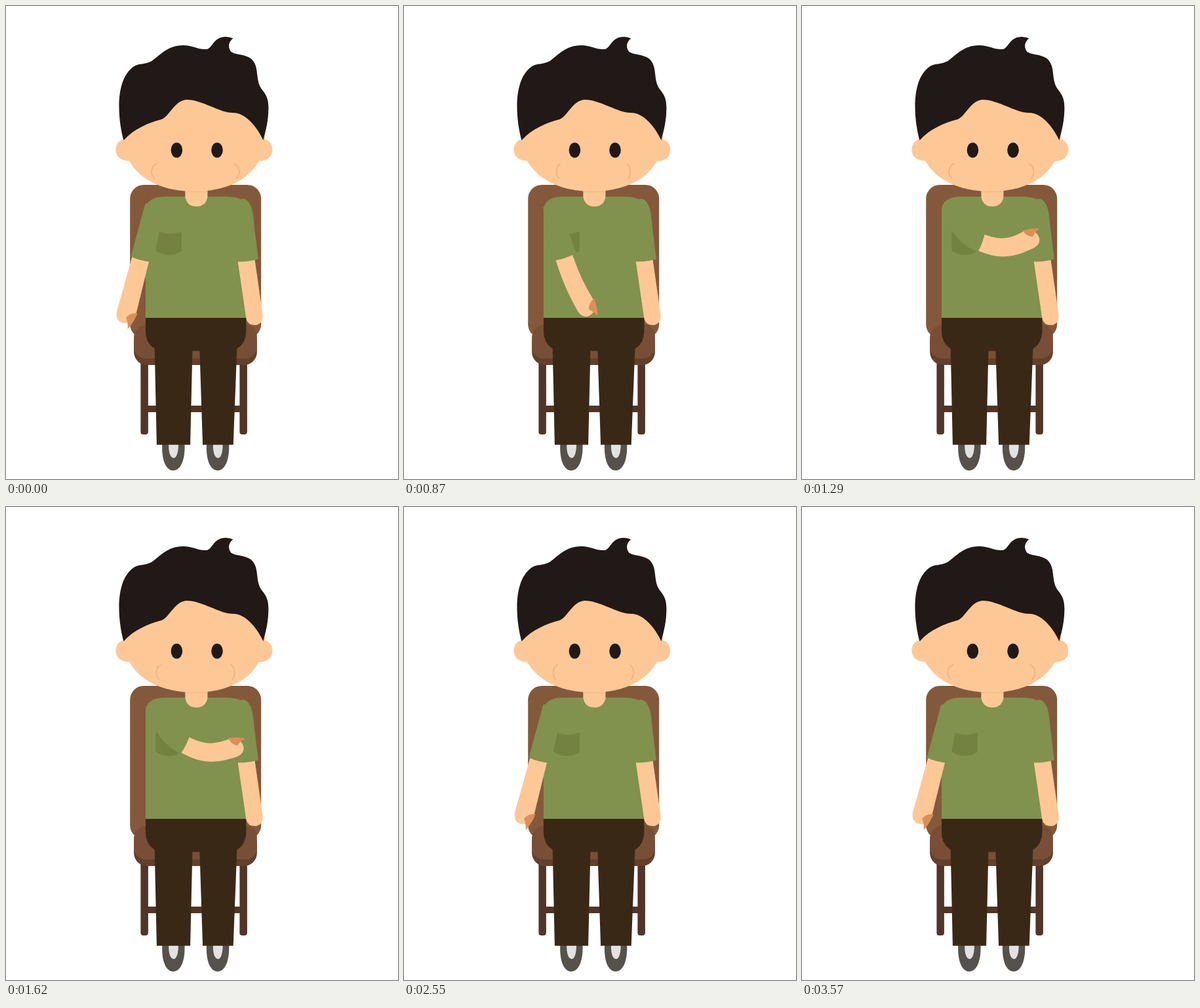
An HTML page that plays this animation: 598 by 722 pixels, repeating every 3600 ms.

```html
<!DOCTYPE html>
<html lang="en">
<head>
<meta charset="utf-8">
<title>Seated man</title>
<style>
  html, body { margin: 0; width: 100%; height: 100%; overflow: hidden; background: #fff; }
  svg { display: block; width: 100%; height: 100%; }
  .skin { fill: #fec896; }
  .shirt { fill: #80924e; }
  .pants { fill: #3a2816; }
  .frame { fill: #513527; }
  .cheek { fill: none; stroke: #efb582; stroke-width: 2; stroke-linecap: round; }
</style>
</head>
<body>
<svg viewBox="0 0 598 722">
  <g transform="translate(0.4 0)">
    <!-- chair -->
    <g class="frame">
      <rect x="205" y="530" width="11.500" height="124" rx="4"/>
      <rect x="356" y="530" width="11.500" height="124" rx="4"/>
      <rect x="212" y="610" width="150" height="10"/>
    </g>
    <rect fill="#84593b" x="188.800" y="273" width="200" height="234" rx="21"/>
    <path fill="#62402b" d="M194.700 510H382.500V528A20 20 0 0 1 362.500 548H214.700A20 20 0 0 1 194.700 528Z"/>
    <path fill="#784f36" d="M213 486H366Q382.500 488 382.500 504V520A18 18 0 0 1 364.500 538H212.700A18 18 0 0 1 194.700 520V504Q197 489 213 486Z"/>

    <!-- shoes and trousers -->
    <g id="shoe">
      <path fill="#56524b" d="M238 667H272C273.500 692 266 709 255 709C243 709 236.500 692 238 667Z"/>
      <path fill="#e3e2e0" d="M248 667H262.500C263 680 260 690 255.500 690C250 690 247 680 248 667Z"/>
    </g>
    <use href="#shoe" x="67.700"/>
    <path class="pants" d="M212.500 475H366V497Q365 516 352 523L346.300 669.800H299.700L295 526.500H284L280.700 669.800H229.500L226.300 523Q213 515 212.500 497Z"/>

    <!-- torso -->
    <path class="shirt" d="M212.500 476V312Q213 291 243 291H335Q350 291 357 295L366 310V476Z"/>
    <path class="skin" d="M353 388L379 386L391 470Q393 483 382 487Q368 488 366 477Z"/>
    <path class="shirt" d="M350 300L357 295Q369 291 375 311Q377 320 378 334L384.500 386.500Q368 391 352 390L340 340Z"/>
    <path fill="#738241" d="M228 342Q248 352 267.500 344V374Q250 386 228 374Z"/>
    <path class="skin" d="M273 275H307V292Q304 306 290 306Q276 306 273 292Z"/>
    <path stroke="#f0b988" stroke-width="1.500" d="M273 283.500H307"/>

    <!-- head -->
    <g class="skin">
      <path d="M189 204C176 200 167 209 167 219C167 231 176 237 191 236.500Z"/>
      <path d="M384 204C397 200 406 209 406 219C406 231 397 238 382 236.500Z"/>
      <path d="M178 200L240 120H340L395 200C393 254 348 283 287 283S180 254 178 200Z"/>
    </g>
    <path fill="#211917" d="M179 205C170 172 165 112 195 92C203 87 211 90 222 84C233 77 245 60 270 60C285 60 293 67 306 66C315 64 316 47 335 47Q341 47 346 49.500C340 54 337 62 343 70C351 75 362 73 373 80C387 92 379 110 389 126C394 133 400 138 400 155C400 175 396 190 392 205C384 187 366 163 346 163C325 163 299 143 275 143C257 144 249 168 237 173C218 178 195 187 179 205Z"/>
    <g fill="#1f1a17">
      <ellipse cx="260" cy="220" rx="8.800" ry="11.500"/>
      <ellipse cx="321.600" cy="220" rx="8.800" ry="11.500"/>
    </g>
    <path class="cheek" id="cheekL"/>
    <path class="cheek" id="cheekR"/>
  </g>

  <!-- moving arm -->
  <path class="skin" id="arm"/>
  <path fill="#dd8e59" id="thumb"/>
  <path class="shirt" id="sleeve"/>
</svg>
<script>
const LOOP = 3600, STEP = 30;
const $ = id => document.getElementById(id);
const mix = (a, b, k) => a + (b - a) * k;
const smooth = k => k * k * (3 - 2 * k);
const ease = (t, a, b) => {
  const k = Math.min(1, Math.max(0, (t - a) / (b - a)));
  return (1 - Math.cos(Math.PI * k)) / 2;
};

// lift, then the angle from straight down at shoulder, cuff and hand
const poses = [
  [0, -14.5, -14.5, -14.5],
  [0.12, -4, -4, -4],
  [0.784, 29.5, 50, 75],
  [0.935, 27, 64, 108],
  [1, 26, 70, 116]
];

function poseAt(p) {
  let i = 1;
  while (i < poses.length - 1 && p > poses[i][0]) i++;
  const a = poses[i - 1], b = poses[i], k = (p - a[0]) / (b[0] - a[0]);
  return [1, 2, 3].map(j => mix(a[j], b[j], k) * Math.PI / 180);
}

// Returns at(s, w): the point s along the bent arm and w to its inner side.
function bendArm(p) {
  const [upper, cuff, hand] = poseAt(p), scale = 1 - 0.095 * p;
  const angle = s =>
    s < 30 ? upper :
    s < 84 ? mix(upper, cuff, (s - 30) / 54) :
    s < 165 ? mix(cuff, hand, smooth((s - 84) / 81)) : hand;
  const spine = [[226, 305]];
  for (let s = 0; s < 200; s++) {
    const [x, y] = spine[s], a = angle(s + 0.5);
    spine.push([x + scale * Math.sin(a), y + scale * Math.cos(a)]);
  }
  return (s, w) => {
    const [x, y] = spine[Math.max(0, s)], a = angle(s), back = Math.min(0, s);
    return (x + Math.sin(a) * back + Math.cos(a) * w).toFixed(2) + ' ' +
           (y + Math.cos(a) * back - Math.sin(a) * w).toFixed(2);
  };
}

function edge(at, from, to, w0, w1) {
  const n = 16, pts = [];
  for (let i = 0; i <= n; i++) {
    pts.push(at(Math.round(mix(from, to, i / n)), mix(w0, w1, i / n)));
  }
  return pts.join('L');
}

function drawArm(p) {
  const at = bendArm(p);
  $('arm').setAttribute('d',
    'M' + edge(at, 76, 170, -13, -14.8) +
    'Q' + at(183, -14) + ' ' + at(185, -4) +
    'Q' + at(186, 6) + ' ' + at(177, 11) +
    'L' + edge(at, 166, 76, 14.6, 13.5) + 'Z');
  $('thumb').setAttribute('d',
    'M' + at(165, 16.5) +
    'Q' + at(167, 5) + ' ' + at(176, 1.3) +
    'Q' + at(182, 6) + ' ' + at(192, 8) +
    'Q' + at(182, 14) + ' ' + at(165, 16.5) + 'Z');
  $('sleeve').setAttribute('d',
    'M' + edge(at, 0, 84, -14, -15) +
    'Q' + at(87, 0) + ' ' + at(84, 19) +
    'L' + edge(at, 83, 12, 20, 16) +
    'Q' + at(-8, 4) + ' ' + at(0, -14) + 'Z');
}

function drawCheeks(t) {
  const u = (1 - Math.cos(2 * Math.PI * t / 600)) / 2;
  const arc = (id, inner, outer) => {
    const x = k => mix(inner, outer, k).toFixed(2);
    $(id).setAttribute('d',
      `M${x(0)} 241C${x(1.1)} 245 ${x(1.35)} 256 ${x(0.4)} 263`);
  };
  arc('cheekL', 229 + 9 * u, 221.5 + 11 * u);
  arc('cheekR', 348 - 7.5 * u, 355.5 - 11 * u);
}

function draw(now) {
  const t = Math.floor(now % LOOP / STEP) * STEP;
  drawArm(ease(t, 615, 1200) - ease(t, 1530, 2075));
  drawCheeks(t);
}

const start = performance.now();
function tick() {
  draw(performance.now() - start);
  requestAnimationFrame(tick);
}
tick();
</script>
</body>
</html>
```
